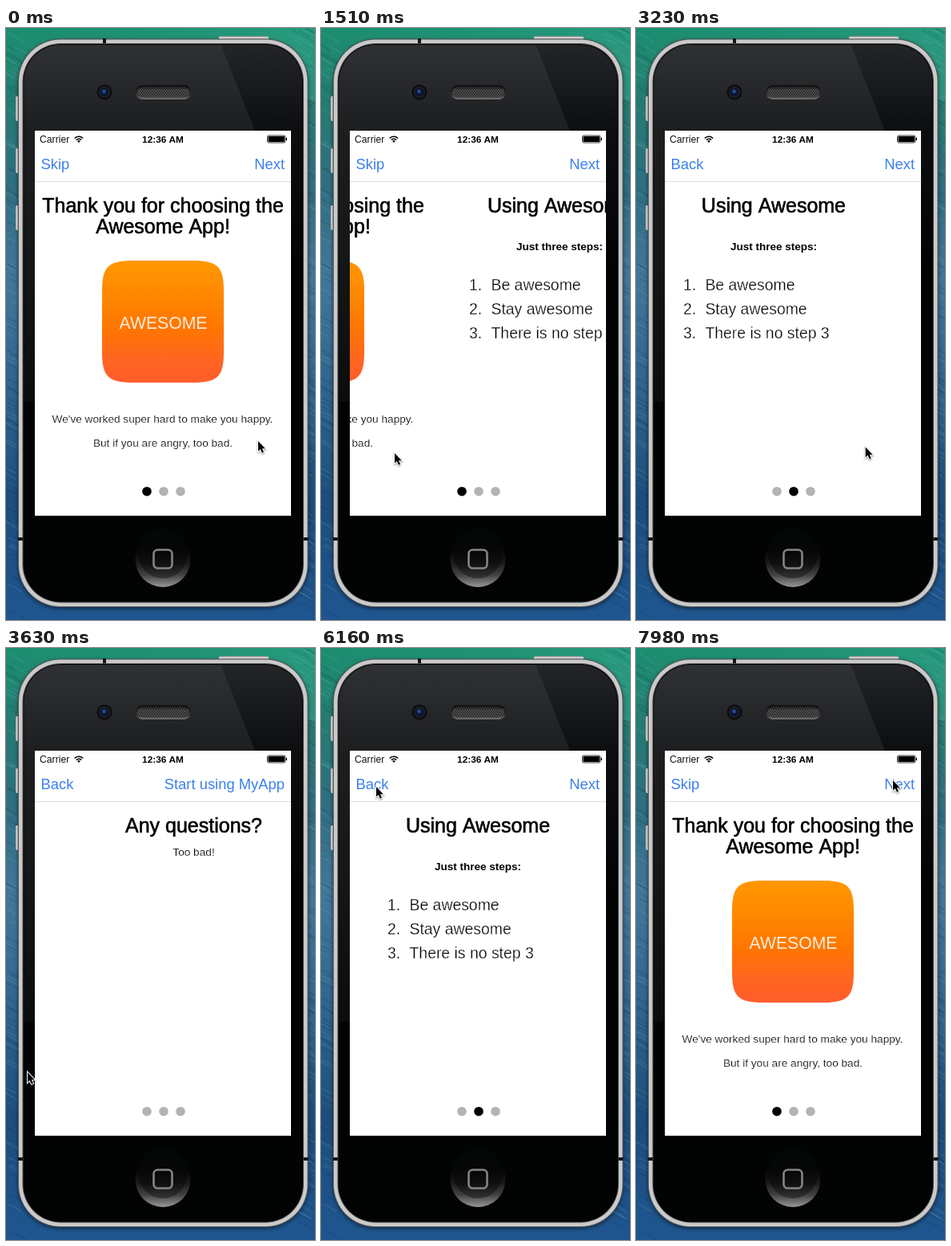
An HTML page with a canvas for the animation above (8000 ms loop, 386 px wide and 738 px high).

```html
<!DOCTYPE html>
<html lang="en">
<head>
<meta charset="utf-8">
<title>Onboarding walkthrough</title>
<style>
  html, body { margin: 0; width: 100%; height: 100%; overflow: hidden; background: #1d5080; }
  canvas { display: block; width: 386px; height: 738px; }
</style>
</head>
<body>
<canvas id="stage"></canvas>
<script>
const W = 386, H = 738, LOOP = 8000;
const SANS = '"Liberation Sans", Arial, sans-serif';
const BLUE = '#3b7fee';
const dpr = window.devicePixelRatio || 1;

function setup(canvas) {
  canvas.width = W * dpr;
  canvas.height = H * dpr;
  const c = canvas.getContext('2d');
  c.scale(dpr, dpr);
  return c;
}
const ctx = setup(document.getElementById('stage'));
const backdrop = document.createElement('canvas');

// ---------- motion ----------
const ease = {
  in: p => p * p,
  out: p => 1 - (1 - p) * (1 - p),
  glide: p => 1 - Math.pow(1 - p, 3),
  both: p => p * p * (3 - 2 * p),
  line: p => p
};

// Each key: time, easing into it, values
const scrollKeys = [
  [1070, 'line', 0], [1220, 'in', 43], [1510, 'out', 218],
  [1640, 'line', 218], [1930, 'glide', 320],
  [3150, 'line', 320], [3600, 'both', 601.5],
  [3700, 'line', 601.5], [3960, 'out', 640],
  [5670, 'line', 640], [6130, 'both', 320],
  [6660, 'line', 320], [7160, 'both', 0]
];
const cursorKeys = [
  [1070, 'line', 314, 513], [1220, 'in', 266, 512], [1510, 'out', 91, 528],
  [2150, 'line', 91, 528], [2290, 'in', 193, 517], [2690, 'out', 310, 520],
  [3150, 'line', 310, 520], [3600, 'both', 26, 527],
  [4220, 'line', 26, 527], [4300, 'in', 18, 390], [4370, 'out', 41, 237],
  [4590, 'line', 41, 237], [5040, 'both', 68, 172],
  [5180, 'line', 68, 172], [5190, 'line', 68, 171],
  [7340, 'line', 68, 171], [7490, 'both', 320, 151],
  [7680, 'line', 320, 151], [7820, 'both', 308, 156], [7980, 'both', 320, 163]
];

function sample(keys, t) {
  let a = keys[0];
  for (const b of keys) {
    if (t < b[0]) {
      if (b === a) break;
      const p = ease[b[1]]((t - a[0]) / (b[0] - a[0]));
      return a.slice(2).map((v, i) => v + (b[i + 2] - v) * p);
    }
    a = b;
  }
  return a.slice(2);
}

// The last entry at or before t wins
const step = (list, t) => list.reduce((v, [at, next]) => t >= at ? next : v, 0);
const navSteps = [[1655, 1], [3610, 2], [5700, 1], [6690, 0]];
const dotSteps = [[1655, -1], [1940, 1], [3610, -1], [4020, 2],
                  [5700, -1], [6160, 1], [6690, -1], [7190, 0]];

// ---------- helpers ----------
function box(c, x, y, w, h, r, fill) {
  c.beginPath();
  c.roundRect(x, y, w, h, r);
  c.fillStyle = fill;
  c.fill();
}
function disc(c, x, y, r, fill) {
  c.beginPath();
  c.arc(x, y, r, 0, Math.PI * 2);
  c.fillStyle = fill;
  c.fill();
}
function shape(c, points, fill) {
  c.beginPath();
  points.forEach(([x, y]) => c.lineTo(x, y));
  c.closePath();
  c.fillStyle = fill;
  c.fill();
}
function ramp(c, x0, y0, x1, y1, ...stops) {
  const g = c.createLinearGradient(x0, y0, x1, y1);
  stops.forEach(([p, col]) => g.addColorStop(p, col));
  return g;
}
// edge: a thin outline that makes the glyphs heavier or lighter
function text(c, str, x, y, size, { align = 'left', color = '#000', bold = false, edge = 0, edgeColor = color } = {}) {
  c.font = (bold ? 'bold ' : '') + size + 'px ' + SANS;
  c.textAlign = align;
  c.fillStyle = color;
  c.fillText(str, x, y);
  if (edge) {
    c.lineWidth = edge;
    c.lineJoin = 'round';
    c.strokeStyle = edgeColor;
    c.strokeText(str, x, y);
  }
}
const heading = (str, y) => text(ctx, str, 196, y, 25, { align: 'center', edge: 0.6 });
const light = (str, x, y, size, align) =>
  text(ctx, str, x, y, size, { align, edge: size * 0.018, edgeColor: '#fff' });

// ---------- desktop and handset ----------
function drawSea(c) {
  c.fillStyle = ramp(c, 0, 0, 0, H, [0, '#1c8e70'], [0.13, '#257b72'], [0.27, '#2f6e82'],
    [0.42, '#42779a'], [0.6, '#30668f'], [0.8, '#1c4d7d'], [1, '#1f5690']);
  c.fillRect(0, 0, W, H);
  c.fillStyle = ramp(c, 0, 0, W, 0, [0, 'rgba(40,160,130,0)'], [1, 'rgba(60,180,150,.35)']);
  c.fillRect(0, 0, W, 90);

  let seed = 7;
  const rnd = () => (seed = seed * 16807 % 2147483647) / 2147483647;
  c.lineWidth = 1.5;
  for (let i = 0; i < 190; i++) {
    const x = rnd() < 0.5 ? rnd() * 18 : W - rnd() * 18;
    const y = rnd() * H, len = 6 + rnd() * 12;
    c.strokeStyle = rnd() < 0.5 ? 'rgba(150,210,215,.13)' : 'rgba(0,35,65,.15)';
    c.beginPath();
    c.moveTo(x - len, y - len * 0.5);
    c.quadraticCurveTo(x, y - 2, x + len, y + len * 0.6);
    c.stroke();
  }
}

function drawHandset(c) {
  const metal = ramp(c, 11, 0, 17, 0, [0, '#777'], [0.4, '#eee'], [1, '#888']);
  [85, 150, 221].forEach(y => box(c, 12, y, 5, 31, 2, metal));
  box(c, 266, 10, 62, 6, 2, ramp(c, 0, 10, 0, 15, [0, '#777'], [0.4, '#eee'], [1, '#888']));

  c.save();
  c.shadowColor = 'rgba(0,0,0,.5)';
  c.shadowBlur = 5 * dpr;
  c.shadowOffsetY = 2 * dpr;
  box(c, 15, 13.5, 362.5, 708.5, 53, '#555');
  c.restore();
  box(c, 16, 14.5, 360.5, 706.5, 52, '#cbcaca');
  box(c, 20.5, 19, 351.5, 697.5, 48, '#555');
  box(c, 21.5, 20, 349.5, 695.5, 47, '#020303');
  c.fillStyle = '#161616';
  c.fillRect(121, 13, 4, 6);
  c.fillRect(15, 635, 6, 4);
  c.fillRect(371.5, 635, 6, 4);

  // Glass reflections
  c.save();
  c.beginPath();
  c.roundRect(22.5, 21, 347.5, 693.5, 46);
  c.clip();
  c.fillStyle = ramp(c, 0, 20, 0, 300, [0, '#242528'], [0.38, '#0d0e10'], [1, '#020303']);
  c.fillRect(22, 20, 350, 280);
  shape(c, [[22, 20], [268, 20], [311, 128], [36, 128], [36, 466], [22, 466]],
    ramp(c, 0, 20, 0, 466, [0, '#303134'], [0.24, '#1d1e20'], [0.6, '#151617'], [1, '#0b0c0c']));
  c.restore();

  // Camera
  disc(c, 123, 80, 9.5, '#0a0b0d');
  disc(c, 123, 80, 7.5, '#1b1d23');
  disc(c, 123, 80, 5, '#0a1430');
  disc(c, 122.5, 79, 2.5, '#24468c');

  // Earpiece
  box(c, 162, 71.5, 69, 17.5, 8.5, ramp(c, 0, 71, 0, 89, [0, '#050505'], [0.7, '#333'], [1, '#777']));
  c.save();
  c.beginPath();
  c.roundRect(164, 73.5, 65, 13, 6.5);
  c.fillStyle = '#555557';
  c.fill();
  c.clip();
  c.fillStyle = '#171717';
  for (let y = 74, row = 0; y < 87; y += 2, row++)
    for (let x = 164 + (row % 2) * 1.5; x < 230; x += 3) c.fillRect(x, y, 1.6, 1.4);
  c.fillStyle = 'rgba(0,0,0,.35)';
  c.fillRect(163, 73, 68, 3);
  c.restore();

  // Home key
  disc(c, 196, 662.5, 34.5, ramp(c, 0, 628, 0, 697,
    [0, '#020303'], [0.35, '#080808'], [0.55, '#181818'], [0.78, '#414141'], [1, '#989898']));
  disc(c, 196, 655, 31, ramp(c, 0, 650, 0, 686, [0, '#050606'], [0.5, '#101010'], [1, '#343434']));
  c.beginPath();
  c.roundRect(184.5, 650.5, 23, 23, 5);
  c.lineWidth = 2.6;
  c.strokeStyle = '#858585';
  c.stroke();

  c.fillStyle = '#fff';
  c.fillRect(36, 128, 320, 480);
}

function drawStatus(c) {
  text(c, 'Carrier', 42, 143, 12.2, { color: '#111' });
  text(c, '12:36 AM', 196, 143, 11.8, { align: 'center', bold: true });

  c.strokeStyle = '#000';
  c.lineWidth = 1.6;
  [4.2, 7.2].forEach(r => {
    c.beginPath();
    c.arc(91, 142.5, r, -Math.PI * 0.76, -Math.PI * 0.24);
    c.stroke();
  });
  c.beginPath();
  c.moveTo(91, 143);
  c.arc(91, 142.5, 2.4, -Math.PI * 0.78, -Math.PI * 0.22);
  c.fillStyle = '#000';
  c.fill();

  c.lineWidth = 0.8;
  c.beginPath();
  c.roundRect(326.5, 134, 22.5, 9, 2);
  c.stroke();
  box(c, 327.5, 135, 20.5, 7, 1, '#000');
  box(c, 349.5, 136.8, 1.5, 3.4, 0.7, '#000');

  c.fillStyle = '#dfdfe1';
  c.fillRect(36, 191, 320, 1);
}

// ---------- pages ----------
function drawWelcome() {
  heading('Thank you for choosing the', 230);
  heading('Awesome App!', 256);
  const r = 38, x = 120, y = 290, s = 152, k = 0.2 * r;
  ctx.beginPath();
  ctx.moveTo(x + r, y);
  for (let i = 0; i < 4; i++) {
    // One side and one corner of the soft square, turned by quarters
    const p = (u, v) => {
      for (let n = 0; n < i; n++) [u, v] = [s - v, u];
      return [x + u, y + v];
    };
    ctx.lineTo(...p(s - r, 0));
    ctx.bezierCurveTo(...p(s - k, 0), ...p(s, k), ...p(s, r));
  }
  ctx.closePath();
  ctx.fillStyle = ramp(ctx, 0, y, 0, y + s,
    [0, '#ff9700'], [0.25, '#ff8a00'], [0.55, '#ff7600'], [0.8, '#ff6620'], [1, '#ff5c2c']);
  ctx.fill();
  text(ctx, 'AWESOME', 196.5, 374.5, 21.2, { align: 'center', color: 'rgba(255,246,236,.92)' });
  light("We've worked super hard to make you happy.", 195.5, 492, 13.65, 'center');
  light('But if you are angry, too bad.', 196, 522, 13.65, 'center');
}

function drawSteps() {
  heading('Using Awesome', 230);
  text(ctx, 'Just three steps:', 196, 277, 13.5, { align: 'center', bold: true });
  ['Be awesome', 'Stay awesome', 'There is no step 3'].forEach((str, i) => {
    const y = 327 + i * 30;
    light(i + 1 + '.', 83, y, 19.4, 'left');
    light(str, 110.5, y, 19.4, 'left');
  });
}

function drawQuestions() {
  heading('Any questions?', 230);
  light('Too bad!', 196, 259, 13.65, 'center');
}

const pages = [drawWelcome, drawSteps, drawQuestions];
const navText = [['Skip', 'Next'], ['Back', 'Next'], ['Back', 'Start using MyApp']];

function drawCursor(x, y) {
  ctx.save();
  ctx.translate(x, y);
  ctx.beginPath();
  [[1, 2], [1, 14.6], [3.8, 12], [5.9, 16.7], [8, 15.8], [6, 11.2], [9.9, 11.2]]
    .forEach(([px, py]) => ctx.lineTo(px, py));
  ctx.closePath();
  ctx.lineJoin = 'miter';
  ctx.lineWidth = 2;
  ctx.strokeStyle = '#fff';
  ctx.shadowColor = 'rgba(0,0,0,.45)';
  ctx.shadowBlur = 2 * dpr;
  ctx.shadowOffsetY = dpr;
  ctx.stroke();
  ctx.shadowColor = 'transparent';
  ctx.fillStyle = '#000';
  ctx.fill();
  ctx.restore();
}

function draw(t) {
  ctx.drawImage(backdrop, 0, 0, W, H);

  const [left, right] = navText[step(navSteps, t)];
  text(ctx, left, 43.5, 176, 18.4, { color: BLUE });
  text(ctx, right, 348, 176, 18.4, { color: BLUE, align: 'right' });

  const [scroll] = sample(scrollKeys, t);
  ctx.save();
  ctx.beginPath();
  ctx.rect(36, 192, 320, 416);
  ctx.clip();
  pages.forEach((page, i) => {
    const dx = i * 320 - scroll;
    if (Math.abs(dx) >= 320) return;
    ctx.save();
    ctx.translate(dx, 0);
    page();
    ctx.restore();
  });
  ctx.restore();

  const active = step(dotSteps, t);
  for (let i = 0; i < 3; i++) disc(ctx, 176 + i * 21, 577.7, 5.8, i === active ? '#000' : '#b3b3b3');

  drawCursor(...sample(cursorKeys, t));
}

const base = setup(backdrop);
drawSea(base);
drawHandset(base);
drawStatus(base);

const start = performance.now();
function tick() {
  draw((performance.now() - start) % LOOP);
  requestAnimationFrame(tick);
}
tick();
</script>
</body>
</html>
```
